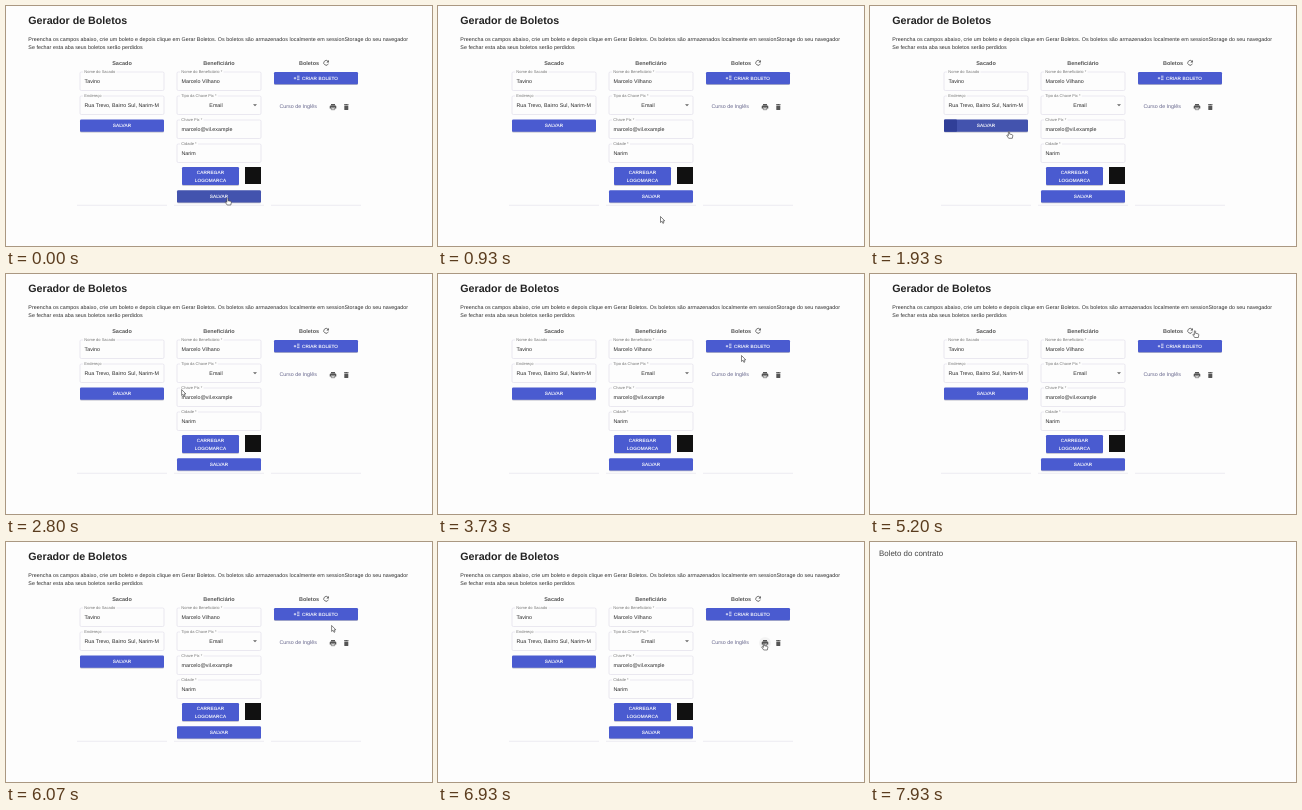
Recreate the animation shown at these times as an HTML page. Size 426 px wide and 240 px high, loop 8000 ms.

```html
<!DOCTYPE html>
<html lang="pt-BR">
<head>
<meta charset="utf-8">
<title>Gerador de Boletos</title>
<style>
  html, body { margin: 0; width: 100%; height: 100%; overflow: hidden; background: #fdfdfd; }
  svg { display: block; width: 100%; height: 100%; }
  text { font: 5.33px "Liberation Sans", Arial, sans-serif; fill: #2c2c2c; text-rendering: geometricPrecision; }
  .title { font-size: 10.67px; font-weight: bold; fill: #222; }
  .intro { letter-spacing: .035px; }
  .heading { font-size: 5.5px; font-weight: bold; fill: #555; text-anchor: middle; }
  .label { font-size: 4px; fill: #777; }
  .caption { font-size: 4.67px; letter-spacing: .13px; fill: #fff; stroke: #fff; stroke-width: .12; text-anchor: middle; }
  .middle { text-anchor: middle; }
  .item { fill: #66668c; }
  .receipt { font-size: 7.9px; fill: #444; }
  .outline { fill: none; stroke: #dedbe8; stroke-width: .6; }
  .button { fill: #4a5bd0; }
  .button.hover { fill: #4353ae; }
  .pointer { fill: #fff; stroke: #333; stroke-width: .6; stroke-linejoin: round; }
</style>
</head>
<body>
<svg viewBox="0 0 426 240">
  <rect width="426" height="240" fill="#fdfdfd"/>
  <g id="form">
    <g id="content"></g>
    <rect id="pressed" x="74" y="113.5" width="13" height="12.3" rx="1" fill="#303f98"/>
    <g id="captions"></g>
    <path d="M287.8 72.2h2.4M289 71v2.4M291 70.2h2.500M291 71.900h2.500M291 73.600h2.500" stroke="#fff" stroke-width=".7"/>
    <rect x="239" y="161" width="16" height="17" fill="#111"/>
    <path d="M247 98.300h4l-2 2z" fill="#666"/>
    <g fill="none" stroke="#555" stroke-width=".8">
      <path d="M322 55.300a2.400 2.400 0 1 0 .4 2.400"/>
      <path d="M322.900 54v2.500h-2.500z" fill="#555" stroke="none"/>
    </g>
    <circle id="halo" cx="327" cy="101" r="6" fill="#000" opacity=".04"/>
    <g fill="#555">
      <path d="M325 98h4v1.300h-4zM324.700 99.600h4.600q1 0 1 1v2h-1.300v-1h-4v1h-1.300v-2q0-1 1-1z"/>
      <path d="M325.300 102h3.400v1.700h-3.400z" fill="#fff" stroke="#555" stroke-width=".6"/>
      <path d="M338 98.300h1.200l.4-.4h1.400l.4.4h1.200v.7H338zM338.300 99.400h4v4q0 .7-.7.7h-2.600q-.7 0-.7-.7z"/>
    </g>
    <path id="arrow" class="pointer" d="M0 0v6l1.400-1.200 1 2.100 1-.5-1-2h1.900z"/>
    <path id="hand" class="pointer" d="M-.6.600q.6-1.200 1.200 0v2.200l2.500.5q.8.300.7 1.200l-.5 2.500H-.3L-2.200 4.300q0-.9.900-.5l.7.600z"/>
  </g>
  <text id="receipt" class="receipt" x="9" y="14">Boleto do contrato</text>
</svg>
<script>
const $ = id => document.getElementById(id);

function add(parent, tag, attributes, content = "") {
  const node = document.createElementNS("http://www.w3.org/2000/svg", tag);
  for (const key in attributes) node.setAttribute(key, attributes[key]);
  node.textContent = content;
  return parent.appendChild(node);
}
const text = (x, y, content, style = "", parent = $("content")) =>
  add(parent, "text", { x, y, class: style }, content);

function field(x, y, label, value, centered) {
  add($("content"), "rect", { x, y, width: 84, height: 18.5, rx: 1.3, class: "outline" });
  const caption = text(x + 4.3, y + 1.4, label, "label");
  const gap = add($("content"), "rect",
    { x: x + 3, y: y - 1, width: caption.getComputedTextLength() + 2.6, height: 2, fill: "#fdfdfd" });
  $("content").insertBefore(gap, caption);
  text(centered ? x + 39 : x + 4.5, y + 11.2, value, centered ? "middle" : "");
}

function button(x, y, width, height, lines, shift = 0) {
  add($("content"), "rect", { x, y: y + .7, width, height, rx: 1.3, fill: "#b9b9c6" });
  const node = add($("content"), "rect", { x, y, width, height, rx: 1.3, class: "button" });
  lines.forEach((line, i) => text(x + width / 2 + shift,
    y + height / 2 + 1.6 + (i - (lines.length - 1) / 2) * 8, line, "caption", $("captions")));
  return { node, x, y, width, height };
}

text(22.3, 17.8, "Gerador de Boletos", "title");
text(22.3, 35, "Preencha os campos abaixo, crie um boleto e depois clique em Gerar Boletos. Os boletos são armazenados localmente em sessionStorage do seu navegador", "intro");
text(22.3, 43, "Se fechar esta aba seus boletos serão perdidos", "intro");
text(116, 59, "Sacado", "heading");
text(213, 59, "Beneficiário", "heading");
text(303, 59, "Boletos", "heading");
for (const x of [71, 168, 265])
  add($("content"), "path", { d: `M${x} 199.300h90`, stroke: "#e6e4ee", "stroke-width": .7 });

field(74, 66, "Nome do Sacado", "Tavino");
field(74, 90, "Endereço", "Rua Trevo, Bairro Sul, Narim-M");
field(171, 66, "Nome do Beneficiário *", "Marcelo Vilhano");
field(171, 90, "Tipo da Chave Pix *", "Email", true);
field(171, 114, "Chave Pix *", "marcelo@vil.example");
field(171, 138, "Cidade *", "Narim");
text(273.5, 102.4, "Curso de Inglês", "item");

const savePayer = button(74, 113.5, 84, 12.3, ["SALVAR"]);
const buttons = [
  savePayer,
  button(171, 184.3, 84, 12.3, ["SALVAR"]),
  button(176, 161, 57, 18, ["CARREGAR", "LOGOMARCA"]),
  button(268, 66, 84, 12.3, ["CRIAR BOLETO"], 4)
];

const LOOP = 8000, RECEIPT_AT = 7450;
// Pointer stops: time, x, y
const stops = [
  [0, 221.5, 192], [250, 221.5, 192], [800, 222.5, 210.5], [1000, 222.5, 210.5],
  [1750, 139, 125.3], [2450, 139, 125.3], [3600, 303.5, 81.5], [3850, 303.5, 81.5],
  [4900, 325, 56.5], [5500, 325, 56.5], [6500, 326, 101], [LOOP, 326, 101]
];

function pointerAt(time) {
  const i = stops.findIndex(stop => stop[0] > time);
  const [t0, x0, y0] = stops[i - 1], [t1, x1, y1] = stops[i];
  const p = (time - t0) / (t1 - t0), eased = p * p * (3 - 2 * p);
  return [x0 + (x1 - x0) * eased, y0 + (y1 - y0) * eased];
}

const inside = (x, y, box) =>
  x >= box.x && x <= box.x + box.width && y >= box.y && y <= box.y + box.height;
const show = (id, visible) => $(id).style.display = visible ? "" : "none";

function draw() {
  const time = performance.now() % LOOP, [x, y] = pointerAt(time);
  let hovering = false;
  for (const box of buttons) {
    const hover = inside(x, y, box);
    box.node.classList.toggle("hover", hover);
    hovering ||= hover;
  }
  const onPrint = Math.hypot(x - 327, y - 101) < 6;
  const onRefresh = Math.hypot(x - 320, y - 57) < 6;
  const hand = hovering || onPrint || onRefresh;
  show("pressed", inside(x, y, savePayer));
  show("halo", onPrint);
  show("hand", hand);
  show("arrow", !hand);
  for (const id of ["hand", "arrow"]) $(id).setAttribute("transform", `translate(${x} ${y})`);
  show("form", time < RECEIPT_AT);
  show("receipt", time >= RECEIPT_AT);
  requestAnimationFrame(draw);
}
draw();
</script>
</body>
</html>
```
